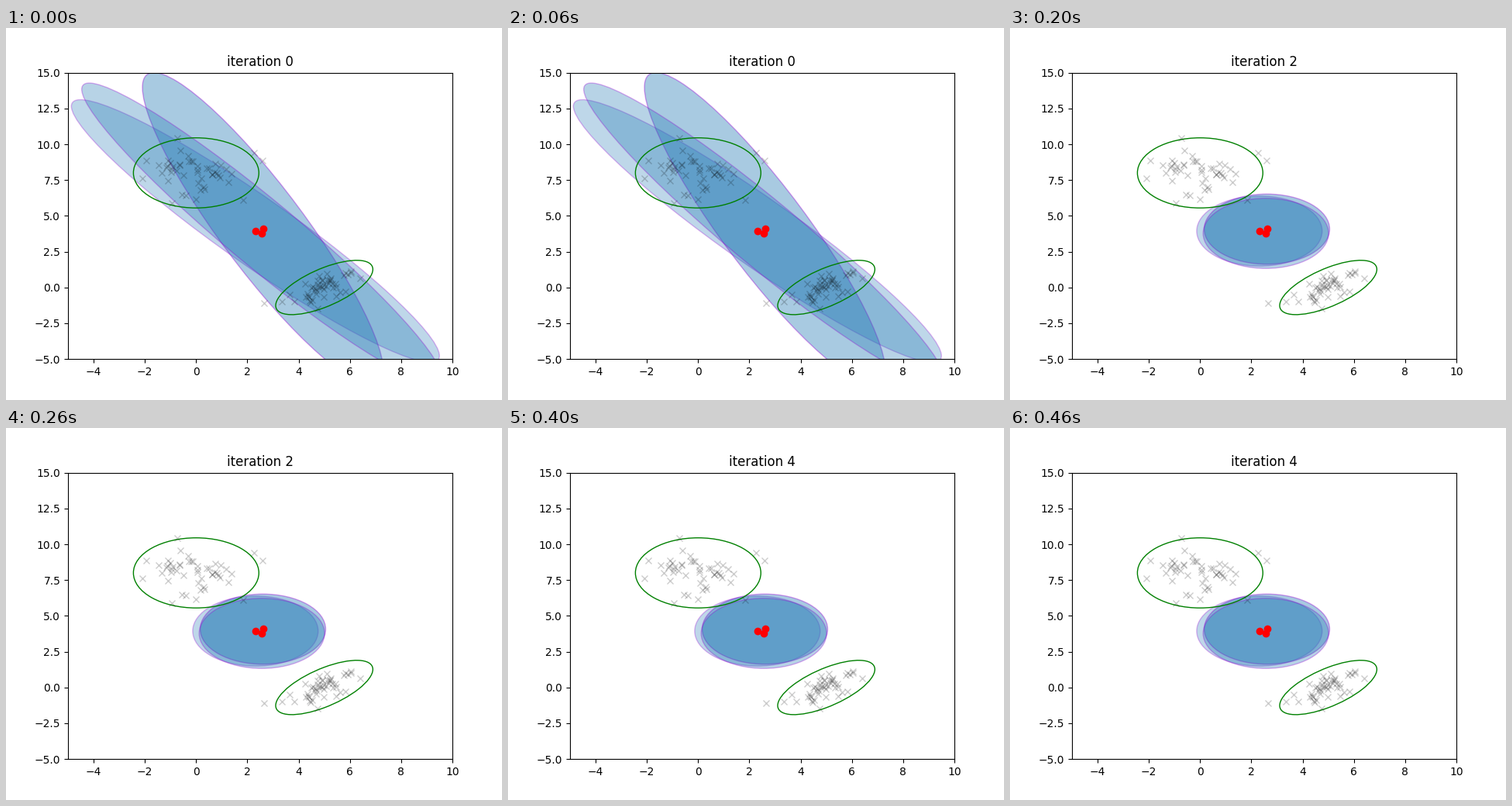
Write a matplotlib script that moves like this. It is 640x480 px and loops after 500 ms.

```python
import numpy as np
import matplotlib.pyplot as plt
from matplotlib.animation import FuncAnimation
from matplotlib.patches import Circle
from matplotlib.transforms import Affine2D

plt.rcParams["text.kerning_factor"] = 6

RADIUS = np.sqrt(5.991)  # 95 % confidence region in two dimensions

# A normal is (sigma x, sigma y, correlation)
UNIT = (1, 1, 0)
TILTED = (np.sqrt(.6), np.sqrt(.6), 2 / 3)

MEANS = np.array([(2.313, 3.94), (2.606, 4.075), (2.565, 3.777)])
WEIGHTS = (.29, .39, .32)
FIRST_FIT = [(2.934, 3.747, -.95), (1.921, 4.466, -.905), (2.872, 4.289, -.958)]
COLLAPSE = [(2.57, 4.19, -.915), (.173, .36, -.9999), UNIT]
COLLAPSED = [UNIT] * 3

rng = np.random.RandomState(4)


def spread(shape):
    """Matrix that turns the unit circle into the normal's contour."""
    sx, sy, rho = shape
    return np.array([[sx, 0], [rho * sy, sy * np.sqrt(1 - rho ** 2)]])


def cluster(mean, shape, count, outliers):
    """Random points of a normal's core, followed by its outliers."""
    z = rng.normal(size=(4 * count, 2))
    core = z[np.hypot(*z.T) < 1.9][:count]
    return np.vstack([core @ spread(shape).T + mean, outliers])


upper = cluster((0, 8), UNIT, 42, [
    (-.74, 10.43), (2.27, 9.41), (2.6, 8.87), (-1.94, 8.86),
    (-2.1, 7.6), (1.82, 6.13), (-.95, 5.9), (0, 6.15)])
lower = cluster((5, 0), TILTED, 45, [
    (2.66, -1.1), (3.36, -1), (4.74, -1.48), (6.4, .63), (6.05, 1.02)])

fig, ax = plt.subplots(figsize=(6.4, 4.8), dpi=100)


def add_ellipse(mean, shape, **style):
    """Add the confidence ellipse of a normal."""
    matrix = np.eye(3)
    matrix[:2, :2] = spread(shape)
    matrix[:2, 2] = mean
    ax.add_patch(Circle((0, 0), RADIUS, joinstyle="round",
                        transform=Affine2D(matrix) + ax.transData, **style))


def draw(step):
    ax.clear()
    for points in (upper, lower):
        ax.plot(*points.T, "x", color="black", alpha=.2)
    shapes = (FIRST_FIT, COLLAPSE, COLLAPSED)[min(step, 2)]
    for mean, shape, weight in zip(MEANS, shapes, WEIGHTS):
        add_ellipse(mean, shape, fc="tab:blue", ec="darkviolet", alpha=weight)
    add_ellipse((0, 8), UNIT, fc="none", ec="g")
    add_ellipse((5, 0), TILTED, fc="none", ec="g")
    ax.plot(*MEANS.T, "ro")
    ax.set(xlim=(-5, 10), ylim=(-5, 15), title=f"iteration {step}")
    return ax.get_children()


anim = FuncAnimation(fig, draw, frames=5, interval=100, repeat=True,
                     repeat_delay=0)
plt.show()
```
